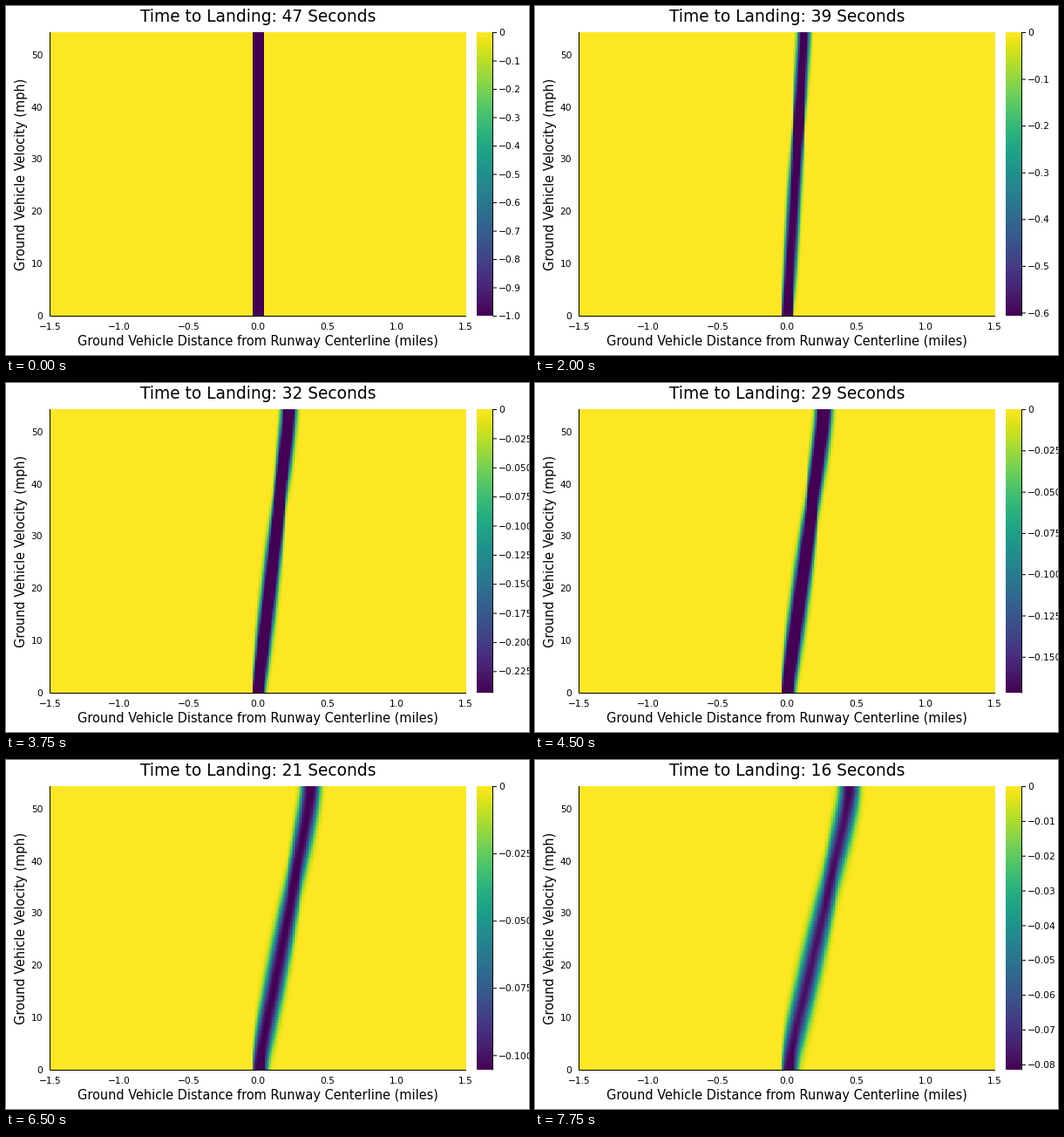
A matplotlib script for the animation above (8000 ms loop, 600 by 400 pixels).

```python
import numpy as np
import matplotlib.pyplot as plt
from matplotlib.animation import FuncAnimation

FRAMES, INTERVAL = 32, 250
LEFT, RIGHT, TOP, BOTTOM = 50.5, 527.5, 30.5, 355.5   # axis line centres
BAR_LEFT, BAR_RIGHT = 540, 558.5
VMAX = 54.25          # mph
CELL = 0.01           # miles
DISCOUNT = 0.95
MAX_TICKS = 12

plt.rcParams["font.family"] = "DejaVu Sans"


def cap(step):
    """Largest undiscounted cost: falls from 1 to 0.4."""
    t = max(step - 2, 0) / 11.2
    return 0.4 + 0.6 * np.exp(-t ** 3)


def solve():
    """Backward value iteration over distance and velocity."""
    x = -1.5 + CELL * (np.arange(300) + 0.5)
    v = np.linspace(0, VMAX, 109)
    cost = np.tile((np.abs(x) < 0.04).astype(float), (len(v), 1))
    # random acceleration as (change of velocity in mph, probability)
    noise = ((-1.2, 0.3), (0, 0.4), (1.2, 0.3))
    mix = np.zeros((len(v), len(v)))
    rows = np.arange(len(v))
    for change, chance in noise:
        pos = np.clip(v + change, 0, VMAX) / (v[1] - v[0])
        low = np.minimum(pos.astype(int), len(v) - 2)
        mix[rows, low] += chance * (1 - (pos - low))
        mix[rows, low + 1] += chance * (pos - low)

    stages = [cost]
    for step in range(1, FRAMES):
        mean = mix @ cost
        moved = [np.interp(x - s / 3600, x, row) for s, row in zip(v, mean)]
        cost = np.minimum(moved, cap(step))
        stages.append(cost)
    return stages


def tick_step(depth):
    """Spacing and decimals of the colour bar ticks."""
    for limit, step, digits in ((0.1, 0.01, 2), (0.25, 0.025, 3), (0.45, 0.05, 2)):
        if depth < limit:
            return step, digits
    return 0.1, 1


def minus(text):
    return text.replace("-", "\u2212")


fig = plt.figure(figsize=(6, 4), dpi=100, facecolor="white")
ax = fig.add_axes([0, 0, 1, 1])


def label(x, y, text, px, **kw):
    kw = {"ha": "center", "va": "baseline", "color": "black", **kw}
    return ax.text(x, y, text, fontsize=px * 0.72, **kw)


def line(xs, ys):
    return ax.plot(xs, ys, color="black", lw=0.72, snap=False,
                   solid_capstyle="butt")[0]


def image(data, left, right):
    return ax.imshow(data, extent=(left, right, BOTTOM - 0.5, TOP - 0.5),
                     cmap="viridis", vmin=-1, vmax=0, origin="lower",
                     aspect="auto", interpolation="nearest")


stages = solve()
heat = image(-stages[0], LEFT + 0.5, RIGHT + 0.5)
image(np.linspace(-1, 0, 256)[:, None], BAR_LEFT, BAR_RIGHT - 0.5)
ax.set_xlim(0, 600)
ax.set_ylim(400, 0)
ax.axis("off")

line([LEFT, LEFT], [TOP - 0.5, BOTTOM])
line([LEFT, RIGHT + 0.5], [BOTTOM, BOTTOM])
line([BAR_RIGHT, BAR_RIGHT], [TOP - 0.5, BOTTOM])

for i in range(7):
    label(LEFT + i * (RIGHT - LEFT) / 6, 371, minus(f"{-1.5 + i / 2:.1f}"), 10.6)
for speed in range(0, 60, 10):
    y = BOTTOM - speed / VMAX * (BOTTOM - TOP)
    label(42.2, y + 3.7, str(speed), 10.6, ha="right")

title = label(289.5, 18, "", 18.6)
label(289, 388.5, "Ground Vehicle Distance from Runway Centerline (miles)", 14.55)
label(25, 192.5, "Ground Vehicle Velocity (mph)", 14.55, rotation=90,
      va="center", ha="right")

marks = [line([BAR_RIGHT, 563], [0, 0]) for _ in range(MAX_TICKS)]
names = [label(565.3, 0, "", 10.6, ha="left") for _ in range(MAX_TICKS)]


def draw(frame):
    top = cap(frame)
    depth = top * DISCOUNT ** frame
    heat.set_data(-stages[frame] / top)
    title.set_text(f"Time to Landing: {47 - frame} Seconds")
    step, digits = tick_step(depth)
    for i, (mark, name) in enumerate(zip(marks, names)):
        shown = i * step <= depth + 1e-9
        mark.set_visible(shown)
        name.set_visible(shown)
        y = TOP + i * step / depth * (BOTTOM - TOP)
        mark.set_ydata([y, y])
        name.set_y(y + 3.7)
        name.set_text(minus(f"{-i * step:.{digits}f}") if i else "0")
    return [heat, title, *marks, *names]


anim = FuncAnimation(fig, draw, frames=FRAMES, interval=INTERVAL,
                     repeat=True, repeat_delay=0, blit=False)
plt.show()
```
